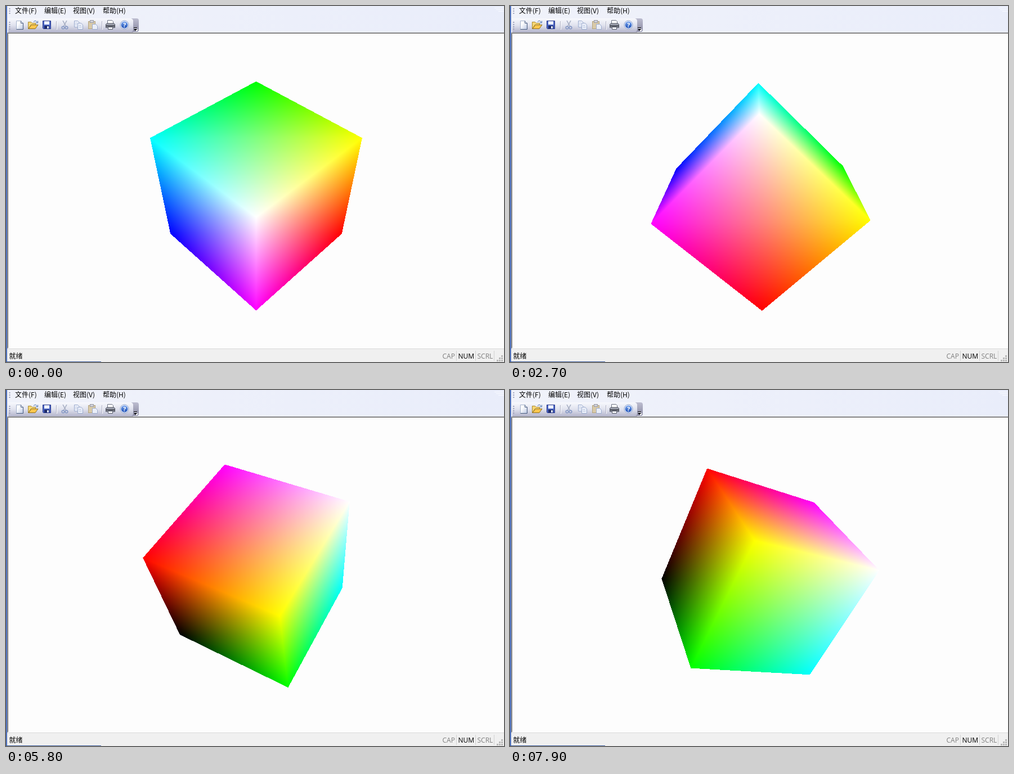
Write an HTML page with a canvas that moves like this. It is 885 px wide and 633 px high and loops after 8200 ms.

```html
<!DOCTYPE html>
<html lang="zh">
<head>
<meta charset="utf-8">
<title>Color cube</title>
<style>
  html, body { margin: 0; width: 100%; height: 100%; overflow: hidden; background: #fdfdfd; }
  svg, canvas { position: absolute; left: 0; top: 0; display: block; }
  .zh { font: 12px "Noto Sans CJK SC", "Noto Sans CJK", sans-serif; fill: #000; }
  .en { font: 12px "Open Sans", "Noto Sans", sans-serif; fill: #808080; }
  .en .on { fill: #000; }
  .mark { font: bold 11px "Open Sans", sans-serif; fill: #fff; }
</style>
</head>
<body>
<svg width="885" height="633" viewBox="0 0 885 633">
  <defs>
    <linearGradient id="bar" x2="0" y2="1">
      <stop offset="0" stop-color="#f8f9fd"/><stop offset=".5" stop-color="#e0e2ee"/><stop offset="1" stop-color="#b2b3ca"/>
    </linearGradient>
    <linearGradient id="cap" x2="0" y2="1">
      <stop offset="0" stop-color="#bdbdd0"/><stop offset="1" stop-color="#8a8aa2"/>
    </linearGradient>
    <linearGradient id="menu" x2="1" y2="0">
      <stop offset="0" stop-color="#f0f2fa"/><stop offset="1" stop-color="#e9edfa"/>
    </linearGradient>
    <linearGradient id="sheet" x2="1" y2="1">
      <stop offset=".3" stop-color="#fff"/><stop offset="1" stop-color="#b9c6e2"/>
    </linearGradient>
    <linearGradient id="ball" x2="0" y2="1">
      <stop offset="0" stop-color="#7ea9f0"/><stop offset="1" stop-color="#174bb4"/>
    </linearGradient>
  </defs>

  <!-- window chrome -->
  <rect width="885" height="48" fill="url(#menu)"/>
  <path d="M4 22H222Q226 22 226 26V47H4Z" fill="url(#bar)"/>
  <path d="M222 22H232Q236 22 236 26V42Q236 46 232 46H222Q226 46 226 42V27Q226 23 222 22Z" fill="url(#cap)"/>
  <path d="M228 39.5h6M229 42h6l-3 3z" stroke="#fff" fill="#fff" stroke-width=".5"/>
  <path d="M227 38.5h6" stroke="#000"/>
  <path d="M227 41h6l-3 3z"/>
  <path d="M6.5 4V15M6.5 28V42" stroke="#9a9db5" stroke-width="2" stroke-dasharray="2 2"/>
  <path d="M868 3.5h17M871 6.5h14M875 9.5h10" stroke="#f8faff"/>
  <path d="M89.5 27V41M170.5 27V41" stroke="#aeb0c4"/>
  <path d="M90.5 28V42M171.5 28V42" stroke="#fff"/>
  <rect y="609" width="885" height="24" fill="#f0f0f0"/>
  <path d="M2 609.5H885" stroke="#d9d9d9"/>
  <path d="M885 47.5H2.5V609" fill="none" stroke="#a0a0a0"/>
  <path d="M885 48.5H3.5V608" fill="none" stroke="#696969"/>
  <path d="M1 0V633" stroke="#4d70bd" stroke-width="2"/>
  <path d="M0 632.5H169" stroke="#41609f"/>
  <path d="M800.5 613V631M834.5 613V631M867.5 613V631" stroke="#d2d2d2"/>
  <path d="M880 621h3v3h-3zM876 625h3v3h-3zM880 625h3v3h-3zM872 629h3v3h-3zM876 629h3v3h-3zM880 629h3v3h-3z" fill="#b8b8b8"/>

  <g class="zh">
    <text x="16" y="13">文件(F)</text>
    <text x="68" y="13">编辑(E)</text>
    <text x="119" y="13">视图(V)</text>
    <text x="172" y="13">帮助(H)</text>
    <text x="5.5" y="627">就绪</text>
  </g>
  <g class="en">
    <text x="775.5" y="627">CAP</text>
    <text x="803.5" y="627" class="on">NUM</text>
    <text x="837.5" y="627">SCRL</text>
  </g>

  <!-- new -->
  <path d="M18.5 26.5h8l4 4v11h-12z" fill="url(#sheet)" stroke="#a4b2cc"/>
  <path d="M26.5 26.5v4h4v11h-12" fill="none" stroke="#46597c"/>
  <!-- open -->
  <path d="M39.5 40.5v-12h5l2 2h6v3h-8z" fill="#f5d573" stroke="#a98a35"/>
  <path d="M40 40.5l5-7h12l-5 7z" fill="#fbc64d" stroke="#8b6c22"/>
  <path d="M49 28q4-4 6 1m1.5-2.5v3.5h-3.5" fill="none" stroke="#4c74b5"/>
  <!-- save -->
  <path d="M65.5 26.5h14v14h-13l-1-1z" fill="#4c66c4" stroke="#25348a"/>
  <rect x="68" y="27" width="9" height="6" fill="#eef2ff"/>
  <rect x="68" y="35" width="9" height="5" fill="#1d2a68"/>
  <rect x="73" y="36" width="3" height="4" fill="#dfe6fa"/>
  <!-- cut -->
  <path d="M101 26l5.5 10M108 26l-5.5 10" stroke="#a3abc0" stroke-width="1.5"/>
  <g fill="none" stroke="#8497c4" stroke-width="1.5"><circle cx="101.5" cy="38.5" r="2.3"/><circle cx="107.5" cy="38.5" r="2.3"/></g>
  <!-- copy -->
  <g fill="#eaeef8" stroke="#9babcd">
    <path d="M121.5 26.5h6l3 3v8h-9z"/><path d="M127.5 30.5h6l3 3v8h-9z"/>
    <path d="M123 30.5h3M123 33.5h3M129.5 34.5h4M129.5 37.5h5" stroke="#b4c2de"/>
  </g>
  <!-- paste -->
  <rect x="146.5" y="27.5" width="12" height="13" fill="#d9caa8" stroke="#b2a380"/>
  <rect x="149.5" y="25.5" width="6" height="4" fill="#cfd1d9" stroke="#9a9ba5"/>
  <path d="M153.5 32.5h6l3 3v6h-9z" fill="#eaeef8" stroke="#9babcd"/>
  <!-- print -->
  <path d="M180.5 32v-6.5h8l2 2V32" fill="#fff" stroke="#6d7383"/>
  <path d="M177.5 32.5l2-1.5h12l2 1.5v6h-16z" fill="#a0a4b0" stroke="#4c505c"/>
  <path d="M178 35.5h15" stroke="#383b45" stroke-width="2"/>
  <path d="M181.5 37.5h8v4h-8z" fill="#f6f7fb" stroke="#555a68"/>
  <!-- help -->
  <circle cx="210.5" cy="33.5" r="7.5" fill="#f4f7ff" stroke="#8aa0cc"/>
  <circle cx="210.5" cy="33.5" r="6" fill="url(#ball)"/>
  <text x="210.5" y="37.5" text-anchor="middle" class="mark">?</text>
</svg>
<canvas id="view" width="885" height="633"></canvas>
<script>
const LOOP = 8200;
const STEPS = [200, 500, 800, 1100, 1400, 1600, 1900, 2200, 2400, 2700, 2900, 3100, 3300, 3600, 3800,
  4000, 4300, 4500, 4700, 5000, 5200, 5500, 5800, 6000, 6300, 6600, 6900, 7100, 7400, 7700, 7900];
const TURN = -5 * Math.PI / 180, C = Math.cos(TURN), S = Math.sin(TURN);
const CX = 444.5, CY = 328.8, SCALE = 119.1, DEPTH = 0.15;
const BOX = { x: 230, y: 120, w: 440, h: 430 };
const ctx = document.getElementById('view').getContext('2d');

// Each step turns the cube about the world y axis, then about x.
function spin(v, count) {
  let [x, y, z] = v;
  for (let i = 0; i < count; i++) {
    [x, z] = [x * C + z * S, z * C - x * S];
    [y, z] = [y * C - z * S, y * S + z * C];
  }
  return [x, y, z];
}

// Camera: 45 degrees round and 45 degrees up.
function toCamera([x, y, z]) {
  const h = Math.SQRT1_2, near = (x + z) / 2;
  return [(x - z) * h, y * h - near, y * h + near];
}

function corner(v, count) {
  const [x, y, z] = toCamera(spin(v, count));
  const k = SCALE / (1 - DEPTH * z);
  return { x: CX + x * k - BOX.x, y: CY - y * k - BOX.y, rgb: v.map(c => (c + 1) * 127.5) };
}

const mix = (a, b, t) => a.map((c, i) => c + (b[i] - c) * t);

// Scanline Gouraud fill of a convex polygon.
function fillFace(img, pts) {
  const ys = pts.map(p => p.y);
  const last = Math.round(Math.max(...ys));
  for (let row = Math.round(Math.min(...ys)); row < last; row++) {
    const y = row + 0.5, hits = [];
    pts.forEach((p, i) => {
      const q = pts[(i + 1) % pts.length];
      if ((p.y <= y) === (q.y <= y)) return;
      const t = (y - p.y) / (q.y - p.y);
      hits.push({ x: p.x + (q.x - p.x) * t, rgb: mix(p.rgb, q.rgb, t) });
    });
    if (hits.length < 2) continue;
    const [a, b] = hits.sort((m, n) => m.x - n.x);
    for (let x = Math.round(a.x); x < Math.round(b.x); x++) {
      const t = (x + 0.5 - a.x) / (b.x - a.x), o = (row * BOX.w + x) * 4;
      for (let c = 0; c < 3; c++) img.data[o + c] = a.rgb[c] + (b.rgb[c] - a.rgb[c]) * t;
      img.data[o + 3] = 255;
    }
  }
}

function drawCube(count) {
  const img = ctx.createImageData(BOX.w, BOX.h);
  for (let axis = 0; axis < 3; axis++) {
    for (const side of [-1, 1]) {
      const normal = [0, 0, 0];
      normal[axis] = side;
      if (toCamera(spin(normal, count))[2] <= DEPTH) continue;
      const pts = [[-1, -1], [1, -1], [1, 1], [-1, 1]].map(([u, w]) => {
        const v = [...normal];
        v[(axis + 1) % 3] = u;
        v[(axis + 2) % 3] = w;
        return corner(v, count);
      });
      fillFace(img, pts);
    }
  }
  ctx.putImageData(img, BOX.x, BOX.y);
}

const start = performance.now();
let shown = -1;
function tick() {
  const t = (performance.now() - start) % LOOP;
  const count = STEPS.filter(s => s <= t).length;
  if (count !== shown) drawCube(shown = count);
  requestAnimationFrame(tick);
}
tick();
</script>
</body>
</html>
```
